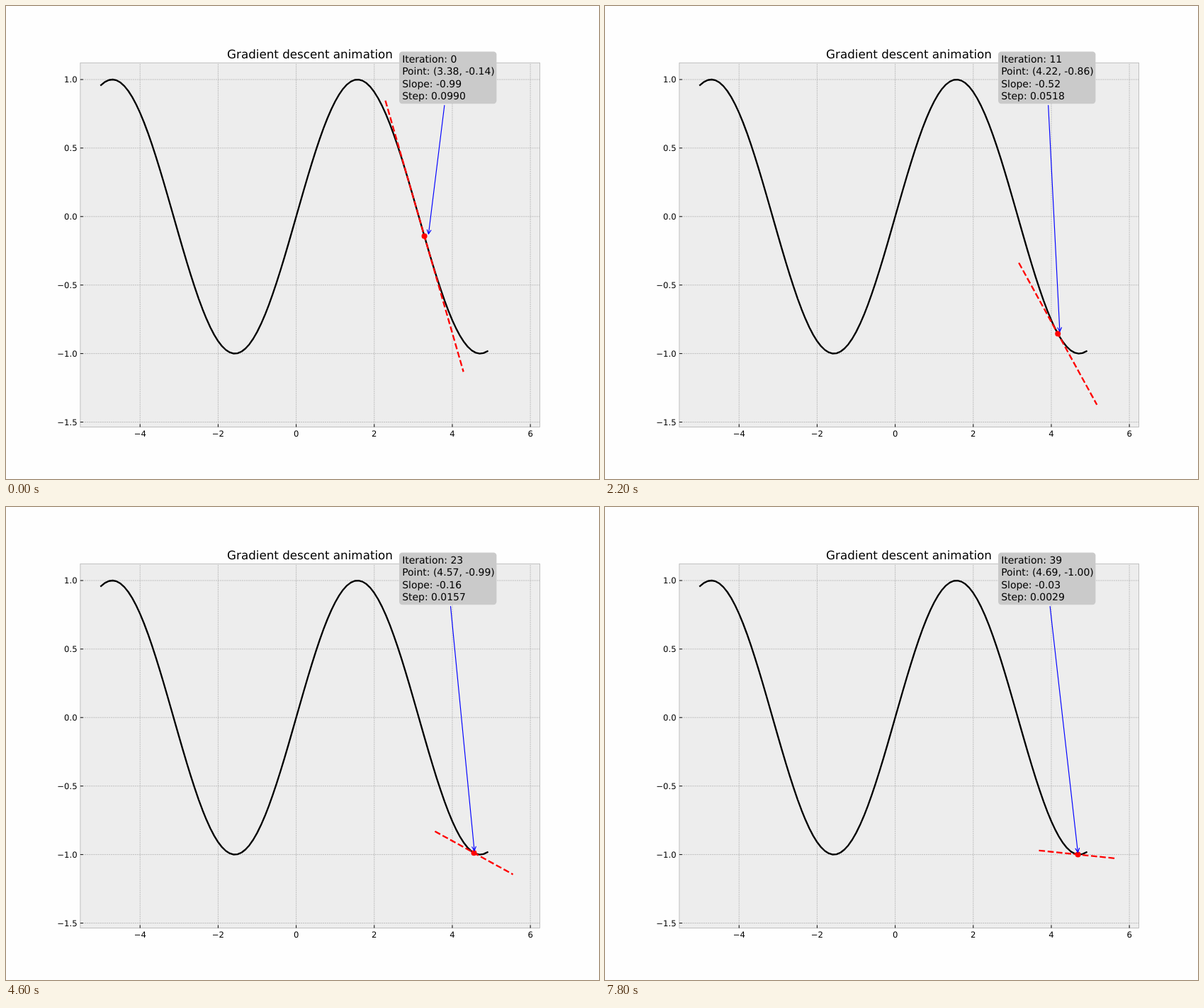
Write an HTML page that moves like this. It is 837 px wide and 669 px high and loops after 8000 ms.

```html
<!DOCTYPE html>
<html lang="en">
<head>
<meta charset="utf-8">
<title>Gradient descent animation</title>
<style>
  html, body { margin: 0; width: 100%; height: 100%; overflow: hidden; background: #fefefe; }
  svg { display: block; width: 837px; height: 669px; }
  text { font-family: "DejaVu Sans", sans-serif; font-size: 11.63px; text-rendering: geometricPrecision; }
  path { fill: none; }
  .grid { stroke: #b2b2b2; stroke-width: .75; stroke-dasharray: 2.15 .93; }
  .tick { stroke: #000; stroke-width: .93; }
  .title { font-size: 16.74px; text-anchor: middle; }
  .curve { stroke: #000; stroke-width: 2.33; stroke-linejoin: round; stroke-linecap: square; }
  .tangent { stroke: #f00; stroke-width: 2.33; stroke-dasharray: 8.6 3.72; }
  .arrow { stroke: #00f; stroke-width: 1.16; stroke-linejoin: round; stroke-linecap: round; }
  .note text { font-size: 13.95px; }
</style>
</head>
<body>
<svg viewBox="0 0 837 669">
  <rect x="104.9" y="80.4" width="648.6" height="515.1" fill="#ededed"/>
  <g id="axes"></g>
  <rect x="104.9" y="80.4" width="648.6" height="515.1" fill="none" stroke="#bcbcbc" stroke-width=".93"/>
  <path id="ticks" class="tick"/>
  <text class="title" x="429" y="73.7">Gradient descent animation</text>
  <path id="curve" class="curve"/>
  <path id="tangent" class="tangent"/>
  <circle id="dot" r="4" fill="#f00"/>
  <path id="arrow" class="arrow"/>
  <g id="note" class="note">
    <rect x="555" y="64.4" width="137.4" height="73.8" rx="4.2" fill="#cacaca"/>
  </g>
</svg>
<script>
const STEP_MS = 200, STEPS = 40, RATE = 0.1, START = 3.2851;
const BOX = { x: 623.7, y: 101.3, bottom: 138.2 };
const $ = id => document.getElementById(id);
const px = x => 409.6 + 55.09 * x;
const py = y => 297.8 - 193.8 * y;
const point = (x, y) => `${px(x).toFixed(2)} ${py(y).toFixed(2)}`;
const setPath = (id, d) => $(id).setAttribute("d", d);

function add(parent, tag, attrs, text = "") {
  const el = document.createElementNS("http://www.w3.org/2000/svg", tag);
  for (const name in attrs) el.setAttribute(name, attrs[name]);
  el.textContent = text;
  return parent.appendChild(el);
}

function drawAxes() {
  const axes = $("axes");
  const label = (value, digits) => value.toFixed(digits).replace("-", "\u2212");
  let ticks = "";
  for (let x = -4; x <= 6; x += 2) {
    add(axes, "path", { class: "grid", d: `M${px(x)} 595.5V80.4` });
    add(axes, "text", { x: px(x), y: 608.8, "text-anchor": "middle" }, label(x, 0));
    ticks += `M${px(x)} 595.5v-4.1`;
  }
  for (let y = -1.5; y <= 1; y += 0.5) {
    add(axes, "path", { class: "grid", d: `M104.9 ${py(y)}H753.5` });
    add(axes, "text", { x: 100.6, y: py(y) + 4.2, "text-anchor": "end" }, label(y, 1));
    ticks += `M104.9 ${py(y)}h4.1`;
  }
  setPath("ticks", ticks);
  const samples = Array.from({ length: 100 }, (_, i) => -5 + i / 10);
  setPath("curve", "M" + samples.map(x => point(x, Math.sin(x))).join("L"));
}

// Arrow from the note's edge to just short of (x, y), with an open head.
function arrowPath(x, y) {
  const dx = x - BOX.x, dy = y - BOX.y, length = Math.hypot(dx, dy);
  const ux = dx / length, uy = dy / length;
  const at = (along, across) =>
    `${(BOX.x + ux * along - uy * across).toFixed(2)} ${(BOX.y + uy * along + ux * across).toFixed(2)}`;
  const start = (BOX.bottom - BOX.y) / uy + 2.33, tip = length - 3.1;
  return `M${at(start, 0)}L${at(tip, 0)}M${at(tip - 5.6, 2.8)}L${at(tip, 0)}L${at(tip - 5.6, -2.8)}`;
}

drawAxes();
const lines = [0, 1, 2, 3].map(i => add($("note"), "text", { x: 559.2, y: 79.7 + 17.45 * i }));
const positions = [START];
for (let i = 0; i < STEPS; i++) positions.push(positions[i] - RATE * Math.cos(positions[i]));

function show(i) {
  const x = positions[i], next = positions[i + 1];
  const y = Math.sin(x), slope = Math.cos(x);
  setPath("tangent", `M${point(x - 1, y - slope)}L${point(x + 1, y + slope)}`);
  $("dot").setAttribute("cx", px(x));
  $("dot").setAttribute("cy", py(y));
  setPath("arrow", arrowPath(px(next), py(y)));
  [
    `Iteration: ${i}`,
    `Point: (${next.toFixed(2)}, ${y.toFixed(2)})`,
    `Slope: ${slope.toFixed(2)}`,
    `Step: ${(next - x).toFixed(4)}`
  ].forEach((text, n) => lines[n].textContent = text);
}

const startTime = performance.now();
function tick() {
  const elapsed = Math.max(0, performance.now() - startTime);
  show(Math.floor(elapsed / STEP_MS) % STEPS);
  requestAnimationFrame(tick);
}
tick();
</script>
</body>
</html>
```
